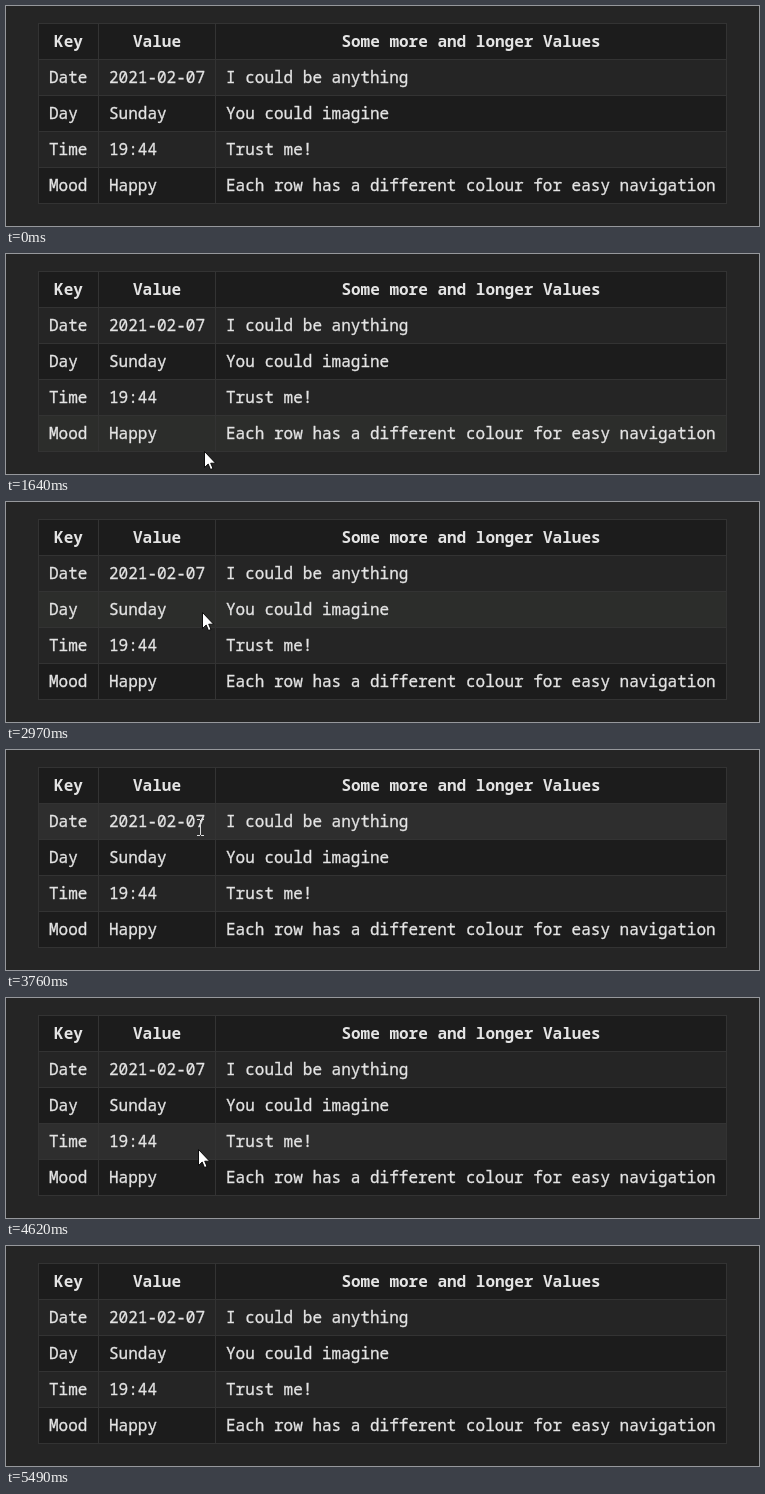
These frames come from a looping animation (753 px wide and 220 px high, 6640 ms). An HTML page:

```html
<!DOCTYPE html>
<html lang="en">
<head>
<meta charset="utf-8">
<title>Table with row hover</title>
<style>
  html, body { margin: 0; width: 100%; height: 100%; overflow: hidden; background: #252525; cursor: default; }
  svg { display: block; width: 753px; height: 220px; }
  text { font: 16px "Noto Sans Mono", "DejaVu Sans Mono", monospace; fill: #e4e4e4; stroke: #e4e4e4; stroke-width: .3px; }
  .head { font-weight: 700; text-anchor: middle; stroke: none; }
  .dark { fill: #1c1c1c; }
  .light { fill: #252525; }
  .dark.hover { fill: #2c2d2b; }
  .light.hover { fill: #2e2e2e; }
  .grid { stroke: #333; fill: none; }
</style>
</head>
<body>
<svg viewBox="0 0 753 220">
  <g id="table"></g>
  <g id="pointer">
    <path id="arrow" fill="#fff" stroke="#000" stroke-width="0.9"
      d="M.5 .5V16.5L4.2 13L6.5 18.5L9 17.5L6.7 12.2H11.6Z"/>
    <path id="beam" fill="none" stroke="#dadada" d="M-2 -8.5H1M2 -8.5H5M1.5 -8V7M-2 7.5H1M2 7.5H5"/>
  </g>
</svg>
<script>
const LOOP = 6640, START = 218, STEP = 78.6;
const LEFT = 32, RIGHT = 720, TOP = 17, ROW = 36, PAD = 11;
const columns = [LEFT, 92, 209, RIGHT];
const heads = ["Key", "Value", "Some more and longer Values"];
const data = [
  ["Date", "2021-02-07", "I could be anything"],
  ["Day", "Sunday", "You could imagine"],
  ["Time", "19:44", "Trust me!"],
  ["Mood", "Happy", "Each row has a different colour for easy navigation"]
];
// Pointer stops: step, x, y, ease-out power (1 when omitted)
const stops = [
  [0, 663, 209], [7, 271, 211, 2], [11, 204, 210], [12, 204, 210],
  [18, 198, 197], [24, 197, 172], [26, 197, 172], [35, 196, 110],
  [40, 193, 72], [44, 193, 72], [53, 192, 129], [56, 192, 151],
  [59, 192, 168], [60, 192, 168], [66, 199, 214]
];
const LAST = stops[stops.length - 1][0];

const $ = id => document.getElementById(id);
const table = $("table"), pointer = $("pointer"), arrow = $("arrow"), beam = $("beam");

function add(tag, attrs, content = "") {
  const el = document.createElementNS("http://www.w3.org/2000/svg", tag);
  for (const name in attrs) el.setAttribute(name, attrs[name]);
  el.textContent = content;
  return table.appendChild(el);
}

const rowY = i => TOP + i * ROW;
const bands = [heads, ...data].map((_, i) => add("rect", {
  x: LEFT, y: rowY(i), width: RIGHT - LEFT + 1, height: ROW, class: i % 2 ? "light" : "dark"
}));
const across = [...bands, null].map((_, i) => `M${LEFT} ${rowY(i) + .5}H${RIGHT + 1}`);
const down = columns.map(x => `M${x + .5} ${TOP}V${rowY(bands.length) + 1}`);
add("path", { class: "grid", d: across.concat(down).join("") });

heads.forEach((label, c) =>
  add("text", { x: (columns[c] + columns[c + 1] + 1) / 2, y: rowY(0) + 24, class: "head" }, label));
data.forEach((cells, i) => cells.forEach((cell, c) =>
  add("text", { x: columns[c] + PAD, y: rowY(i + 1) + 24 }, cell)));

function locate(step) {
  if (step < 0 || step > LAST) return null;
  const n = Math.max(1, stops.findIndex(s => s[0] >= step));
  const [a, ax, ay] = stops[n - 1], [b, bx, by, power = 1] = stops[n];
  const f = 1 - (1 - (step - a) / (b - a)) ** power;
  return [Math.round(ax + (bx - ax) * f), Math.round(ay + (by - ay) * f)];
}

function draw(now) {
  const pos = locate(Math.floor((now % LOOP - START) / STEP));
  pointer.style.display = pos ? "" : "none";
  const hovered = pos ? Math.floor((pos[1] - TOP - 1) / ROW) : -1;
  bands.forEach((band, i) => band.classList.toggle("hover", i === hovered));
  if (!pos) return;
  const overText = pos[1] < 84;
  arrow.style.display = overText ? "none" : "";
  beam.style.display = overText ? "" : "none";
  pointer.setAttribute("transform", `translate(${pos})`);
}

const origin = performance.now();
function tick() {
  draw(performance.now() - origin);
  requestAnimationFrame(tick);
}
tick();
</script>
</body>
</html>
```
